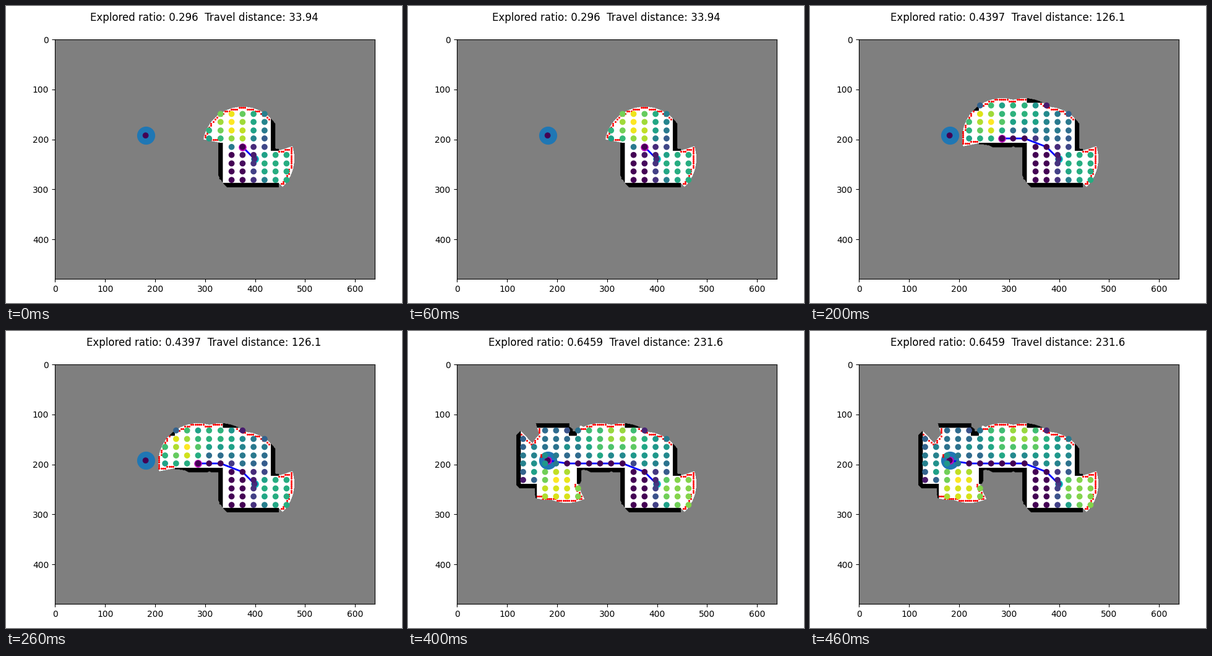
A matplotlib script that plays this animation: 640 by 480 pixels, repeating every 500 ms.

```python
import numpy as np
import matplotlib.pyplot as plt
from matplotlib.animation import FuncAnimation

W, H = 640, 480
UNKNOWN, FREE, WALL = 127, 255, 1
TILE = 16        # the building is laid out in tiles of 16 map cells
REACH = 79.5     # sensor range in cells
DEPTH = 9        # how far a ray enters a wall
VIEW = 70        # range within which a node counts frontier points

# Solid blocks in tiles: x0, y0, x1, y1
BLOCKS = [
    (0, 0, 8, 30), (0, 0, 14, 8), (14, 0, 15, 9),
    (21, 0, 27, 8), (27, 0, 28, 14), (0, 15, 10, 30),
    (15, 13, 21, 15), (17, 15, 21, 30), (17, 18, 28, 30),
]
XS = np.rint(np.linspace(0, W - 1, 30))
YS = np.rint(np.linspace(0, H - 1, 30))
LATTICE = np.array([(x, y) for y in YS for x in XS])

START, GOAL = (399, 239), (181, 192)
STOPS = np.array([START, (375, 215), (331, 198), (286, 198), (220, 198), GOAL])
RATIOS = ["0.296", "0.3762", "0.4397", "0.6103", "0.6459"]
TRAVEL = np.cumsum(np.hypot(*np.diff(STOPS, axis=0).T))


def build_solid():
    solid = np.zeros((H, W), bool)
    for x0, y0, x1, y1 in BLOCKS:
        solid[y0 * TILE:y1 * TILE, x0 * TILE:x1 * TILE] = True
    solid[184:187, 176:179] = True   # thin pillar
    return solid


SOLID = build_solid()


def scan(area, position):
    """Cast rays all around; each one ends a little way into a wall."""
    for angle in np.linspace(0, 2 * np.pi, 1080, endpoint=False):
        step = np.array([np.cos(angle), np.sin(angle)])
        longest = np.abs(step).max()
        t = np.arange(int(REACH * longest) + 1) / longest
        x, y = np.rint(position + t[:, None] * step).astype(int).T
        solid = SOLID[y, x]
        hits = np.cumsum(solid)
        passed = np.cumsum(~solid & (hits > 0)) > 0
        keep = (hits <= DEPTH) & ~passed
        area[y[keep], x[keep]] = np.where(solid[keep], WALL, FREE)


def value_at(area, points):
    x, y = np.rint(points).astype(int).T
    return area[y, x]


def find_frontier(area):
    """Free 4x4 blocks that border on unknown ones."""
    coarse = area.reshape(H // 4, 4, W // 4, 4).min(axis=(1, 3))
    unknown = np.pad((coarse == UNKNOWN).astype(int), 1)
    h, w = coarse.shape
    near = sum(unknown[dy:dy + h, dx:dx + w] for dy in range(3) for dx in range(3))
    rows, cols = np.where((coarse == FREE) & (near > 1) & (near < 8))
    return 4 * np.column_stack([cols, rows])


def count_visible(area, point, frontier):
    near = frontier[np.hypot(*(frontier - point).T) < VIEW]
    if len(near) == 0:
        return 0
    t = np.linspace(0.03, 1, 70)[None, :, None]
    rays = point + t * (near[:, None, :] - point)
    hits = value_at(area, rays.reshape(-1, 2)).reshape(len(near), -1)
    return int((hits == FREE).all(axis=1).sum())


def build_state(area, step):
    frontier = find_frontier(area)
    path = STOPS[:step + 2]
    t = np.linspace(0.1, 1, 60)[None, :, None]
    trail = (path[:-1, None] + t * np.diff(path, axis=0)[:, None]).reshape(-1, 2)

    free = LATTICE[value_at(area, LATTICE) == FREE]
    nodes = np.vstack([GOAL, START, free])
    utility = [0]
    for p in nodes[1:]:
        visited = np.hypot(*(trail - p).T).min() < 2
        utility.append(0 if visited else count_visible(area, p, frontier))
    title = f"Explored ratio: {RATIOS[step]}  Travel distance: {TRAVEL[step]:.4g}"
    return area.copy(), frontier, path, nodes, np.array(utility), title


def explore():
    area = np.full((H, W), UNKNOWN)
    scan(area, STOPS[0])
    for step, stop in enumerate(STOPS[1:]):
        scan(area, stop)
        yield build_state(area, step)


states = list(explore())

fig = plt.figure(figsize=(W / 100, H / 100), dpi=100)
ax = fig.add_axes([79 / W, 38.55 / H, 517 / W, 387.75 / H])
title = fig.suptitle("", fontsize=12)

picture = ax.imshow(states[0][0], cmap="gray", vmin=0, vmax=255, aspect="auto")
ax.scatter(*GOAL, s=400, color="C0", zorder=2)
line, = ax.plot([], [], "b", lw=2, zorder=2.5)
robot, = ax.plot([], [], "mo", ms=8, zorder=4)
ax.plot(*START, "co", ms=8, zorder=4)
edge = ax.scatter([], [], s=5, c="red", linewidths=0, zorder=3)
dots = ax.scatter([0], [0], c=[0], cmap="viridis", zorder=5)

ax.set_xlim(-0.5, W - 0.5)
ax.set_ylim(H - 0.5, -0.5)
ax.set_xticks(range(0, W, 100))
ax.set_yticks(range(0, H, 100))


def update(i):
    area, frontier, path, nodes, utility, text = states[i]
    picture.set_data(area)
    line.set_data(*path.T)
    robot.set_data(*path[-1:].T)
    dots.set_offsets(nodes)
    dots.set_array(utility)
    dots.set_clim(0, utility.max())
    edge.set_offsets(frontier)
    title.set_text(text)
    return picture, line, robot, dots, edge, title


anim = FuncAnimation(fig, update, frames=len(states), interval=100,
                     repeat=True, repeat_delay=0, blit=False)
plt.show()
```
